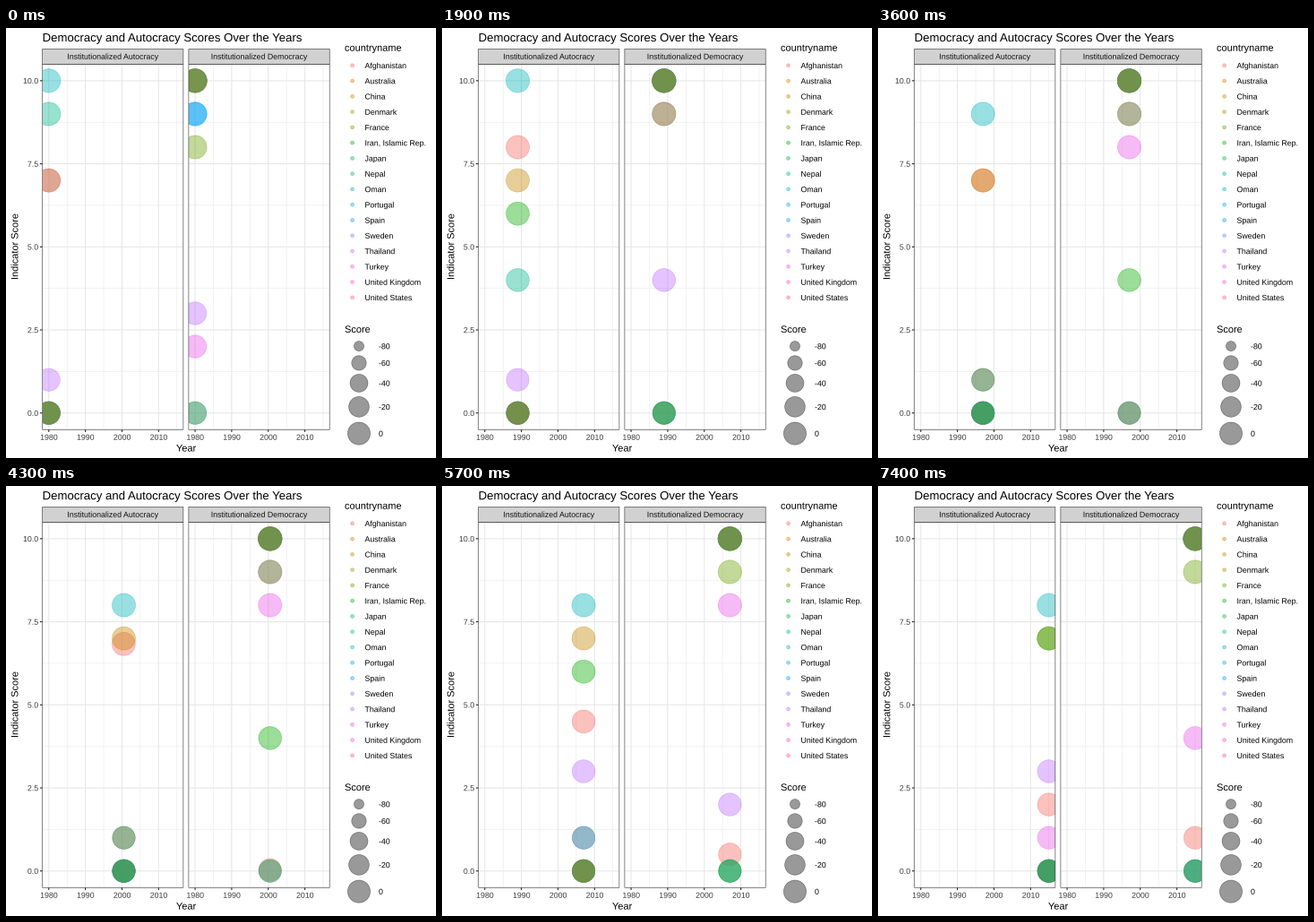
A matplotlib script for the animation above (7500 ms loop, 480x480 px).

```python
import numpy as np
import matplotlib.pyplot as plt
from matplotlib.animation import FuncAnimation
from matplotlib.patches import Circle, PathPatch, Rectangle
from matplotlib.textpath import TextPath
from matplotlib.transforms import Affine2D

plt.rcParams["font.family"] = "Liberation Sans"

PT = 0.75  # points per pixel at 96 dpi
FRAMES, FIRST, LAST = 75, 1980, 2015
ALPHA = 0.4
GAMMA = 2.2 / 1.8  # all colours are slightly darkened by the display gamma

COUNTRIES = ["Afghanistan", "Australia", "China", "Denmark", "France",
             "Iran, Islamic Rep.", "Japan", "Nepal", "Oman", "Portugal",
             "Spain", "Sweden", "Thailand", "Turkey", "United Kingdom",
             "United States"]

# Scores that hold from a year on: (year, autocracy, democracy)
FULL = [(FIRST, 0, 10)]
STEPS = {
    "Afghanistan": [(1989, 8, 0), (1992, None, None), (1996, 7, 0),
                    (2001, None, None), (2014, 2, 1)],
    "China": [(FIRST, 7, 0)],
    "France": [(FIRST, None, 8), (1986, None, 9)],
    "Iran, Islamic Rep.": [(1982, 6, 0), (1997, 1, 4), (2004, 6, 0), (2009, 7, 0)],
    "Nepal": [(FIRST, 9, None), (1981, 4, None), (1990, 0, None),
              (2002, 7, None), (2006, 1, None), (2008, 0, None)],
    "Oman": [(FIRST, 10, 0), (1991, 9, 0), (2000, 8, 0)],
    "Portugal": [(FIRST, 0, 9), (1982, 0, 10)],
    "Spain": [(FIRST, 0, 9), (1982, 0, 10)],
    "Thailand": [(FIRST, 1, 3), (1988, 1, 4), (1992, 0, 9), (2006, 3, 2),
                 (2008, 1, 5), (2011, 0, 7), (2014, 0 + 3, 0)],
    "Turkey": [(FIRST, 7, 2), (1983, 0, 7), (1989, 0, 9), (1993, 1, 8),
               (2011, 0, 9), (2014, 1, 4)],
}


def hcl(hue, chroma=100, lum=65):
    """Polar LUV colour as darkened sRGB."""
    angle = np.radians(hue)
    u = chroma * np.cos(angle) / (13 * lum) + 0.19784
    v = chroma * np.sin(angle) / (13 * lum) + 0.46834
    y = ((lum + 16) / 116) ** 3
    x = 9 * y * u / (4 * v)
    z = -x / 3 - 5 * y + 3 * y / v
    rgb = np.array([3.2405 * x - 1.5371 * y - 0.4985 * z,
                    -0.9693 * x + 1.8760 * y + 0.0416 * z,
                    0.0556 * x - 0.2040 * y + 1.0572 * z]).clip(0, 1)
    srgb = np.where(rgb > 0.0031308, 1.055 * rgb ** (1 / 2.4) - 0.055, 12.92 * rgb)
    return tuple(srgb.clip(0, 1) ** GAMMA)


def grey(level):
    return (level ** GAMMA,) * 3


COLOR = {name: hcl(15 + 360 * i / len(COUNTRIES)) for i, name in enumerate(COUNTRIES)}
DARK, LABEL, GRID = grey(0.2), grey(0.3), grey(0.922)

TOP, BOTTOM, WIDTH, STRIP = 40.3, 448.3, 157.3, 23.4
LEFTS = {"Autocracy": 40.6, "Democracy": 203.9}
UNIT_X, UNIT_Y = WIDTH / 38.5, (BOTTOM - TOP) / 11
MAJOR, MINOR, BORDER = 1.07, 0.53, 0.55

fig = plt.figure(figsize=(5, 5), dpi=96, facecolor="white")
ax = fig.add_axes([0, 0, 1, 1])
ax.set(xlim=(0, 480), ylim=(480, 0))
ax.axis("off")


def px(left, year):
    return left + (year - FIRST + 1.75) * UNIT_X


def py(score):
    return BOTTOM - (score + 0.5) * UNIT_Y


def point_radius(size):
    return 0.375 * (2.845 * size + 0.945)


def score_radius(score):
    return point_radius(2 + 10 * np.sqrt((score + 88) / 98))


def line(xs, ys, width, color, z):
    ax.plot(xs, ys, color=color, lw=width * PT, solid_capstyle="butt",
            zorder=z, snap=False)


def box(x, y, w, h, fill):
    ax.add_patch(Rectangle((x, y), w, h, facecolor=fill, edgecolor=DARK,
                           lw=BORDER * PT, zorder=6, snap=False))


def label(x, y, text, size=8.8, color="black", align=0, angle=0):
    """Text on baseline y; align is 0 for left, 0.5 for centre, 1 for right."""
    path = TextPath((0, 0), text, size=size)
    shift = Affine2D().translate(-align * path.get_extents().x1, 0)
    place = shift.rotate_deg(angle).scale(1, -1).translate(x, y)
    ax.add_patch(PathPatch(place.transform_path(path), facecolor=color,
                           lw=0, zorder=9, snap=False))


def dot(x, y, radius, color, z=3):
    rgba = (*color, ALPHA)
    return ax.add_patch(Circle((x, y), radius, facecolor=rgba, edgecolor=rgba,
                               lw=0.71 * PT, zorder=z))


def draw_panel(kind, left):
    right = left + WIDTH
    for offset, width in ((0.5, MINOR), (0, MAJOR)):
        for i in range(5):
            if i + offset <= 4:
                line([left, right], [py(2.5 * (i + offset))] * 2, width, GRID, 1)
            if i < 4:
                line([px(left, FIRST + 10 * (i + offset))] * 2, [TOP, BOTTOM],
                     width, GRID, 1)
    for year in range(FIRST, LAST, 10):
        x = px(left, year)
        line([x, x], [BOTTOM, BOTTOM + 2.75], MAJOR, DARK, 6)
        label(x, 459.8, str(year), color=LABEL, align=0.5)
    box(left, TOP, WIDTH, BOTTOM - TOP, "none")
    box(left, STRIP, WIDTH, TOP - STRIP, grey(0.85))
    label(left + WIDTH / 2, 34.8, "Institutionalized " + kind,
          color=grey(0.1), align=0.5)


def draw_legends():
    label(378, 25.7, "countryname", 11)
    for i, name in enumerate(COUNTRIES):
        y = 41.8 + 17.27 * i
        dot(386.6, y, point_radius(1.5), COLOR[name])
        label(400.5, y + 3.2, name)
    label(378, 340, "Score", 11)
    y = 346.5
    for score in range(-80, 1, 20):
        radius = score_radius(score)
        half = max(8.64, 1.24 * radius)
        y += half
        dot(394, y, radius, (0, 0, 0))
        label(416, y + 3.2, str(score))
        y += half


label(40.6, 15.1, "Democracy and Autocracy Scores Over the Years", 13.2)
label(201, 472.6, "Year", 11, align=0.5)
label(13.4, (TOP + BOTTOM) / 2, "Indicator Score", 11, align=0.5, angle=90)
for score in np.arange(0, 11, 2.5):
    line([37.85, 40.6], [py(score)] * 2, MAJOR, DARK, 6)
    label(35.8, py(score) + 3.2, f"{score:.1f}", color=LABEL, align=1)
for kind, left in LEFTS.items():
    draw_panel(kind, left)
draw_legends()


def yearly(steps, column):
    """Known (year, score) pairs of one country and indicator."""
    rows = []
    for year in range(steps[0][0], LAST + 1):
        score = [step for step in steps if step[0] <= year][-1][column]
        if score is not None:
            rows.append((year, score))
    return rows


class Track:
    """One country's bubble in one panel, tweened between its yearly scores."""

    def __init__(self, name, left, rows, z):
        self.years, self.scores = np.array(rows, float).T
        self.keys = np.round((self.years - FIRST) * (FRAMES - 1) / (LAST - FIRST))
        self.left = left
        self.dot = dot(0, 0, 1, COLOR[name], z)
        self.dot.set_clip_path(Rectangle((left, TOP), WIDTH, BOTTOM - TOP,
                                         transform=ax.transData))

    def update(self, frame):
        year = np.interp(frame, self.keys, self.years)
        score = np.interp(frame, self.keys, self.scores)
        self.dot.set_center((px(self.left, year), py(score)))
        self.dot.set_radius(score_radius(score))
        self.dot.set_visible(bool(frame >= self.keys[0]))


# Countries from Portugal on lie underneath the others.
stack = COUNTRIES[9:] + COUNTRIES[:9]
tracks = []
for column, left in enumerate(LEFTS.values(), 1):
    for i, name in enumerate(stack):
        rows = yearly(STEPS.get(name, FULL), column)
        if rows:
            tracks.append(Track(name, left, rows, 3 + i / 100))


def update(frame):
    for track in tracks:
        track.update(frame)
    return [track.dot for track in tracks]


anim = FuncAnimation(fig, update, frames=FRAMES, interval=100,
                     init_func=lambda: update(0), repeat=True, repeat_delay=0)
plt.show()
```
